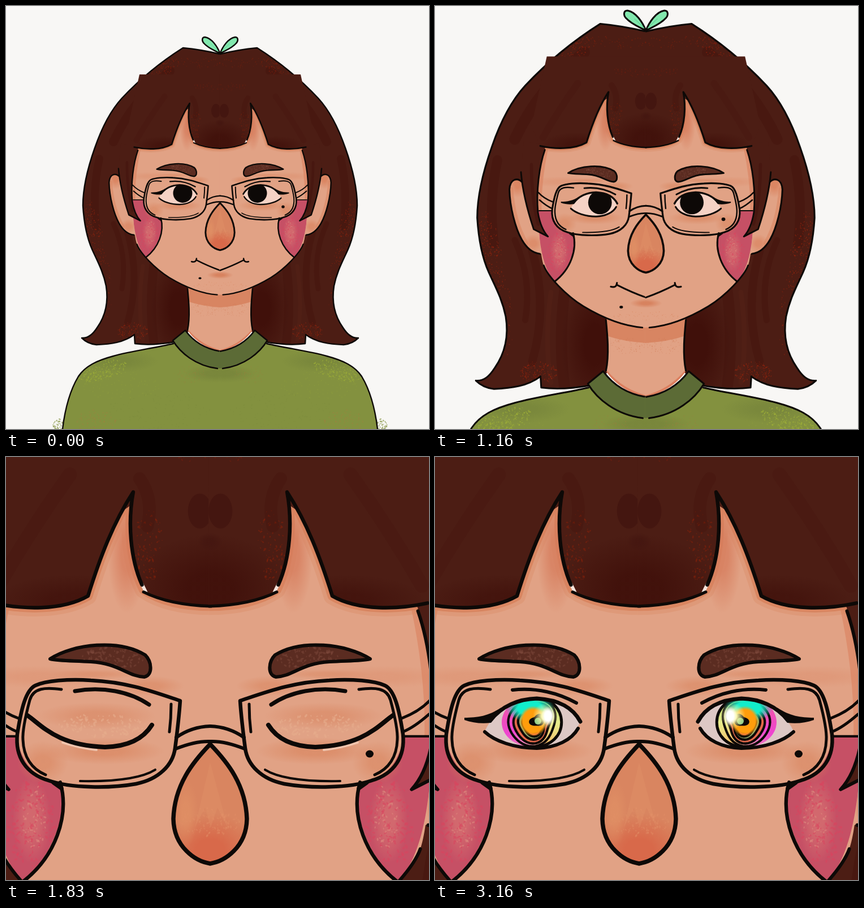
These frames come from a looping animation (748x748 px, 3500 ms). An HTML page with a canvas:

```html
<!DOCTYPE html>
<html lang="en">
<head>
<meta charset="utf-8">
<title>Portrait zoom</title>
<style>
  html, body { margin: 0; width: 100%; height: 100%; overflow: hidden; background: #f8f7f5; }
  canvas { display: block; width: 100%; height: 100%; }
</style>
</head>
<body>
<canvas id="stage" width="748" height="748"></canvas>
<script>
const ctx = document.getElementById('stage').getContext('2d');
const LOOP = 3500, STEPS = 20, CLOSE = 9, SWIRL = 12;
const INK = '#0d0907', SKIN = '#e1a285', BLUSH = '#d97f5a', HAIR = '#4c1d14', DARK = '#40100a';

// camera per step: scale, x, y
const CAMERA = [
  [1, 0, 0], [1.022, -8.6, -6.2], [1.046, -18.1, -13.5], [1.07, -27.5, -20.5],
  [1.0926, -36.4, -26], [1.119, -47, -32.5], [1.1505, -60, -40.1], [1.23, -92.6, -59.6],
  [1.46, -182.6, -115.2], [1.804, -315.8, -198.3], [2.2, -468.7, -293.7], [2.53, -596.6, -373.2]
];
// how far the arm is lowered; null means out of view
const ARM = [null, 250, 85, 0, 0, 110, 290];

// ---------- helpers ----------
function fill(d, color) { ctx.fillStyle = color; ctx.fill(new Path2D(d)); }

function line(d, w, color = INK) {
  ctx.lineWidth = w;
  ctx.strokeStyle = color;
  ctx.stroke(new Path2D(d));
}

function space(scale, x, y, draw) {
  ctx.save();
  ctx.transform(scale, 0, 0, scale, x, y);
  draw();
  ctx.restore();
}

// draws a left half and its mirror image
function both(cx, draw) {
  draw();
  ctx.save();
  ctx.transform(-1, 0, 0, 1, 2 * cx, 0);
  draw();
  ctx.restore();
}

function inside(d, draw) {
  ctx.save();
  ctx.clip(new Path2D(d));
  draw();
  ctx.restore();
}

function oval(x, y, rx, ry, color) {
  ctx.fillStyle = color;
  ctx.beginPath();
  ctx.ellipse(x, y, rx, ry, 0, 0, 7);
  ctx.fill();
}

function soft(x, y, rx, ry, color, core = 0.3) {
  ctx.save();
  ctx.translate(x, y);
  ctx.scale(rx, ry);
  const g = ctx.createRadialGradient(0, 0, 0, 0, 0, 1);
  g.addColorStop(0, color);
  g.addColorStop(core, color);
  g.addColorStop(1, color.slice(0, 7) + '00');
  ctx.fillStyle = g;
  ctx.fillRect(-1, -1, 2, 2);
  ctx.restore();
}

function random(seed) {
  let a = seed * 7919 + 13;
  return () => {
    a = (a * 1664525 + 1013904223) >>> 0;
    return a / 4294967296;
  };
}

function specks(n, x, y, rx, ry, color, size, tilt = 0) {
  const rnd = random(n + x + y | 0);
  ctx.fillStyle = color;
  ctx.save();
  ctx.translate(x, y);
  ctx.rotate(tilt);
  for (let i = 0; i < n; i++) {
    const a = rnd() * 6.283, r = Math.sqrt(rnd()), s = size * (0.4 + rnd() * 0.8);
    ctx.beginPath();
    ctx.ellipse(Math.cos(a) * r * rx, Math.sin(a) * r * ry, s, s * 0.55, rnd() * 3, 0, 7);
    ctx.fill();
  }
  ctx.restore();
}

// ---------- hair, neck and shirt ----------
const OUTLINE = 'M378.5 85 Q345 77 313 74 C275 98 236 130 205 163 C183 187 167 222 157 251 ' +
  'C146 282 136 318 136 353 C138 385 143 410 152.5 431 C162 452 172 470 177 495 ' +
  'C181 520 178 545 161 569 C154 580 146 588 134 587 C142 595 150 598 160 599 ' +
  'C186 598 208 595 227 581 L228 597 C250 600 275 598 298 594';
const MANE = OUTLINE + ' L325 574 H380 V85Z';
const SHIRT = 'M296 597 C262 605 222 610 190 619 C160 627 140 637 128 655 C113 680 104 715 100 748 ' +
  'L96 790 H380 V612 L316 590Z';

function backHair() {
  both(378.5, () => {
    fill(MANE, HAIR);
    inside(MANE, () => {
      soft(305, 535, 50, 95, DARK);
      for (const [d, w] of [
        ['M262 455 Q252 530 262 600', 16], ['M215 400 Q238 480 215 560', 12],
        ['M190 385 Q215 440 205 500', 9], ['M165 270 Q152 330 160 390', 14],
        ['M290 115 Q225 165 190 240', 16]
      ]) line(d, w, '#40100a55');
      line('M242 460 Q232 530 242 590', 7, '#5a251950');
      specks(150, 266, 124, 45, 13, '#8a210c99', 1.1, -0.7);
      specks(60, 335, 100, 45, 10, '#86200a88', 1);
      specks(170, 158, 400, 14, 58, '#98240c99', 1.1, -0.22);
      specks(60, 178, 505, 9, 55, '#98240c80', 1);
      specks(190, 224, 575, 28, 16, '#98240c99', 1.1);
    });
    line(OUTLINE, 2.5);
  });
}

function neck() {
  const d = 'M321 485 C322 510 325 550 321 573 C335 594 357 606 380 611 V485Z';
  both(378.5, () => {
    fill(d, SKIN);
    inside(d, () => {
      line('M286 492 Q325 518 380 521', 24, '#d67f5bcc');
      line('M320 575 Q345 604 380 612', 7, '#dc7f5f');
      specks(90, 352, 538, 27, 13, '#cf7a5777', 0.8);
    });
    line('M321 500 C323 520 326 550 321 573', 2.6);
  });
}

function shirt() {
  both(378.5, () => {
    specks(45, 95, 740, 13, 10, '#83913faa', 1.8);
    fill(SHIRT, '#83913f');
    inside(SHIRT, () => {
      soft(200, 628, 70, 20, '#74823a99');
      soft(370, 650, 55, 16, '#73803999');
      specks(230, 170, 645, 46, 17, '#a1b336aa', 1.2, -0.25);
      specks(120, 205, 672, 70, 25, '#93a23b88', 1);
      specks(70, 322, 652, 30, 16, '#9c7c3d77', 1.1);
      specks(110, 160, 735, 36, 22, '#a77a3e88', 1.2);
      specks(200, 270, 715, 90, 34, '#76853a77', 0.9);
    });
    line('M296 597 C262 605 222 610 190 619 C160 627 140 637 128 655 C113 680 104 715 100 748 L96 790', 2.4);
    fill('M317 573.5 L295 591.5 C308 613 335 638 380 641 V610 C352 606 332 594 317 573.5Z', '#5c6b36');
    line('M378 610.5 C352 606 332 594 317 573.5 L295 591.5 C308 613 335 636 374 641', 2.5);
  });
}

function leaves() {
  const d = 'M378.5 84 C374 72 364 57 352 55 C346 55 346 62 350 66 C358 75 370 79 378.5 84Z';
  both(378.5, () => {
    fill(d, '#82e8ae');
    line(d, 2.5);
    line('M376 80 L362 67', 1, '#4fbf8688');
  });
}

// ---------- head ----------
const FACE = 'M369 60 L95 245 C80 330 82 400 90 470 C92 510 96 545 102 562 ' +
  'C112 590 160 640 205 668 C255 698 310 723 369 723Z';
const BANGS = 'M369 20 V256 C335 256 305 250 283 235 C266 200 262 155 270 112 ' +
  'C245 150 228 195 213 243 C180 262 130 260 93 252 L70 200 L110 20Z';
const CHEEK = 'M88 420 H122 C130 455 148 476 180 480 C187 515 170 570 130 604 C105 575 95 530 90 480Z';
const LOCK = 'M108 250 C90 300 82 370 87 425 C92 455 102 475 113 487 L76 468 C60 420 47 370 43 320 L50 240Z';

function ear() {
  const d = 'M45 345 C35 335 15 335 13 365 C14 410 28 465 45 495 C58 518 75 530 97 532 V470Z';
  fill(d, SKIN);
  inside(d, () => {
    line('M16 365 C20 420 35 470 55 505', 14, '#d97f5a77');
    soft(34, 350, 24, 36, '#d97f5acc');
    soft(75, 505, 26, 24, '#d97f5a99');
  });
  line('M45 345 C35 335 15 335 13 365 C14 410 28 465 45 495 C58 518 75 530 92 532', 4.5);
}

function face() {
  fill(FACE, SKIN);
  inside(FACE, () => {
    line('M104 255 C88 330 82 400 90 470', 20, '#d97f5a88');
    line(BANGS, 22, '#d9876255');
    line(BANGS, 12, '#d9835ccc');
    soft(262, 190, 24, 75, '#d67b5bbb');
    soft(150, 345, 90, 14, '#d97f5a40');
    specks(50, 330, 697, 50, 15, '#d9835c80', 1.4);
    fill(CHEEK, '#c65065');
    inside(CHEEK, () => {
      soft(142, 525, 24, 55, '#d87472aa');
      specks(170, 140, 530, 32, 56, '#d9445f88', 2.2);
      specks(55, 145, 520, 15, 45, '#dd877d99', 1.8);
    });
  });
  line('M90 420 H122', 3);
  line('M178 478 C190 520 172 572 130 604', 4.5);
  line('M102 562 C112 590 160 640 205 668 C255 698 305 719 358 723', 4.2);
  line('M276 617 Q291 621 292 607', 4.5);
  line('M291 612 Q330 632 367 645', 4.5);
}

function fringe() {
  fill(LOCK, HAIR);
  line('M70 300 Q70 390 88 455', 8, '#40100a66');
  line('M105 262 C90 305 82 370 87 425 C92 455 102 475 113 487 L76 468 C60 420 47 370 43 320', 4.2);
  fill(BANGS, HAIR);
  inside(BANGS, () => {
    soft(367, 235, 100, 70, DARK + 'dd');
    soft(195, 250, 100, 34, DARK + 'aa');
    line('M190 90 Q140 160 100 230', 18, '#40100a33');
    specks(90, 290, 180, 18, 46, '#86200a88', 1.7);
    specks(40, 325, 60, 50, 14, '#86200a66', 1.7);
    line('M278 95 Q296 120 288 155', 16, '#40100a44');
    oval(354, 136, 15, 22, '#431510cc');
    soft(367, 175, 16, 12, '#441610cc');
  });
  line('M281 228 L286 238', 4, '#f4e4dc');
  line('M281 229 C266 195 263 150 270 112 C245 150 228 195 213 243 C180 262 130 260 93 252', 4.6);
  line('M283 238 C305 249 335 255 368 256', 3.8);
}

// ---------- eyes, nose and glasses ----------
const EYE = 'M88 485 C106 445 145 428 180 427 C220 429 245 445 257 468 C245 495 215 514 180 515 C140 515 105 502 88 485Z';
const CENTER = [172, 469];
const RINGS = [
  [43, '#dfe088'], [35, '#e4694b'], [28, '#8faa6a'], [21, '#df5f52'], [14, '#4d9fc4'], [8, '#8fcf9d']
];

function blob(x, y, r, bend, phase) {
  ctx.beginPath();
  for (let i = 0; i <= 48; i++) {
    const a = i * Math.PI / 24;
    const q = r * (1 + bend * Math.cos(2 * a + phase) + bend * 0.8 * Math.sin(3 * a - phase));
    ctx.lineTo(x + q * Math.cos(a), y + q * Math.sin(a) * 0.92);
  }
  ctx.closePath();
}

function swirl(k) {
  const [x, y] = CENTER;
  const turn = k < 3 ? 0 : (k - 2) * 0.3;
  const g = ctx.createConicGradient(0, x, y);
  ['#e8ee8c', '#f2c06c', '#f08fb8', '#ee45d0', '#f052b0', '#f2542d', '#a8c566', '#e8ee8c']
    .forEach((c, i) => g.addColorStop(i / 7, c));
  oval(x, y, 54, 44, g);
  line('M172 425 C240 424 242 513 172 513', 5);

  RINGS.forEach(([r, color], i) => {
    blob(x + i, y + (i % 2), r, 0.06 + i * 0.045, 0.9 + turn);
    ctx.fillStyle = i === 0 ? g : color;
    ctx.fill();
    ctx.lineWidth = 4.2;
    ctx.strokeStyle = INK;
    ctx.stroke();
  });

  if (k > 1) {
    const a = [90, 130, 180, 220, 250, 270][k - 2] * Math.PI / 180;
    const grow = 1 + (k - 2) * 0.09;
    soft(x - 4 + 30 * Math.cos(a), y + 25 * Math.sin(a), 30 * grow, 17 * grow, '#12eecb', 0.5);
  }
  if (k > 2) {
    const m = (k - 2) / 5;
    soft(x + 2, y - 2, 25 * m, 27 * m, '#ff9d0c', 0.75);
    if (k > 4) {
      blob(x + 9, y - 3, 12 * m, 0.16, 1);
      ctx.fillStyle = INK;
      ctx.fill();
      oval(x + 10, y - 2, 6, 6, '#86c982');
    }
    soft(x + 23, y - 11, 22 * m, 23 * m, '#f9f6a9', 0.3);
  }
  if (k > 0) soft(x + 28, y - 11, 12, 17, '#ffffff', 0.5);
}

function openEye(k) {
  fill(EYE, k < 0 ? '#f5d2c5' : '#ddc8c5');
  inside(EYE, () => {
    if (k < 0) oval(194, 464, 43, 43, INK);
    else swirl(k);
  });
  line('M98 466 C118 440 148 428 180 427 C220 429 245 445 257 468', 7);
  line('M88 486 C105 502 140 515 180 515 C215 514 242 500 253 480', 6);
  fill('M52 461 C75 461 95 458 117 443 L99 470 C82 472 66 470 52 465Z', INK);
  line('M137 412 C180 407 220 418 250 435', 6);
}

function closedEye() {
  soft(160, 458, 105, 24, '#d9876399');
  specks(110, 170, 474, 78, 20, '#e6ab8caa', 3);
  line('M100 505 Q130 515 160 518', 4, '#f0c4ad');
  line('M38 457 C64 475 90 510 175 513 C220 512 245 495 258 474', 8);
  line('M122 414 C170 405 220 415 253 438', 7);
}

function features(step) {
  const brow = 'M78 357 C120 330 200 322 246 350 C258 362 260 385 245 389 C215 388 200 365 150 362 C120 360 95 361 78 357Z';
  soft(175, 520, 105, 24, '#d9835c99');
  soft(65, 540, 45, 38, '#d9835c88');
  soft(255, 405, 60, 18, '#d9835c80');
  soft(160, 384, 80, 9, '#d9835c66');
  if (step >= CLOSE && step < SWIRL) closedEye();
  else openEye(step - SWIRL);

  fill(brow, '#5b2c21');
  inside(brow, () => specks(90, 185, 355, 60, 20, '#7b473988', 3));
  line(brow, 6);

  line('M308 431 C260 415 215 398 150 395 C110 392 70 396 52 404 C35 412 27 445 20 490 ' +
    'C16 530 35 560 75 572 C115 586 185 586 230 578 C270 570 295 545 299 515 C303 485 306 460 308 431Z', 6.5);
  line('M98 411 C70 407 48 408 42 430 C34 460 29 485 30 500 C31 530 45 552 70 562', 5);
  line('M131 573 C180 574 235 571 264 553', 4);
  line('M292 437 Q292 462 289 486', 5);
  line('M301 496 Q328 477 361 476', 6);
  line('M300 516 Q335 502 361 503', 6);
  line('M-30 428 Q-10 450 22 462', 5);
  line('M-26 455 Q0 478 20 486', 5);
  line('M84 576 L98 586', 7);
}

function nose() {
  const d = 'M361 508 C330 540 298 580 296 640 C297 690 335 715 361 719 C387 715 425 690 426 640 C424 580 392 540 361 508Z';
  fill(d, '#d98560');
  inside(d, () => {
    soft(361, 695, 85, 65, '#d8694a');
    soft(318, 630, 22, 60, '#e19165aa');
    fill('M361 540 L334 655 L352 620 L362 655 L374 620 L392 655Z', '#e0946a55');
    specks(110, 361, 645, 55, 25, '#e0906866', 2.5);
  });
  line(d, 7.5);
}

function head(step) {
  space(1 / 1.804, 175.06, 109.92, () => {
    both(367, ear);
    both(367, face);
    soft(367, 660, 42, 12, '#d57b56cc');
    oval(303, 670, 4.5, 3.5, INK);
    both(367, fringe);
  });
  space(1 / 2.53, 235.8, 147.5, () => {
    both(361, () => features(step));
    nose();
    oval(643, 525, 7, 6.5, INK);
  });
}

// ---------- raised arm ----------
function arm(drop) {
  const d = 'M534 750 C526 690 525 640 525 600 C526 560 522 520 515 495 C505 470 494 445 496 425 ' +
    'C498 415 508 418 516 426 C522 433 527 440 531 446 C530 425 520 395 521 372 C522 355 545 346 570 345 ' +
    'C592 346 598 358 600 375 C607 410 606 450 601 480 C598 495 596 505 598 512 C612 570 630 640 654 750';
  ctx.save();
  ctx.translate(drop * 0.12, drop);
  line('M624 622 Q640 680 655 745', 9, '#dd8f82aa');
  fill(d, SKIN);
  inside(d, () => {
    specks(150, 560, 375, 40, 22, '#d9835c80', 1.3);
    specks(160, 592, 450, 11, 65, '#d9835c88', 1.3);
    specks(150, 600, 570, 14, 70, '#d9776088', 1.4, -0.2);
    specks(230, 560, 735, 55, 26, '#d9734f99', 1.4);
    specks(40, 512, 445, 10, 22, '#d9734f99', 1.3);
  });
  line(d, 3.6);
  ctx.restore();
}

// ---------- playback ----------
function paint(step) {
  const [s, x, y] = CAMERA[Math.min(step, CAMERA.length - 1)];
  ctx.setTransform(1, 0, 0, 1, 0, 0);
  ctx.lineCap = ctx.lineJoin = 'round';
  ctx.fillStyle = '#f8f7f5';
  ctx.fillRect(0, 0, 748, 748);
  space(s, x, y, () => {
    backHair();
    neck();
    shirt();
    head(step);
    leaves();
  });
  const drop = ARM[step];
  if (drop != null) arm(drop);
}

const startOf = i => Math.floor(i * 100 / 6) * 10;
const begin = performance.now();
let shown = -1;

function tick() {
  const t = (performance.now() - begin) % LOOP;
  let step = STEPS - 1;
  while (startOf(step) > t) step--;
  if (step !== shown) paint(shown = step);
  requestAnimationFrame(tick);
}
tick();
</script>
</body>
</html>
```
